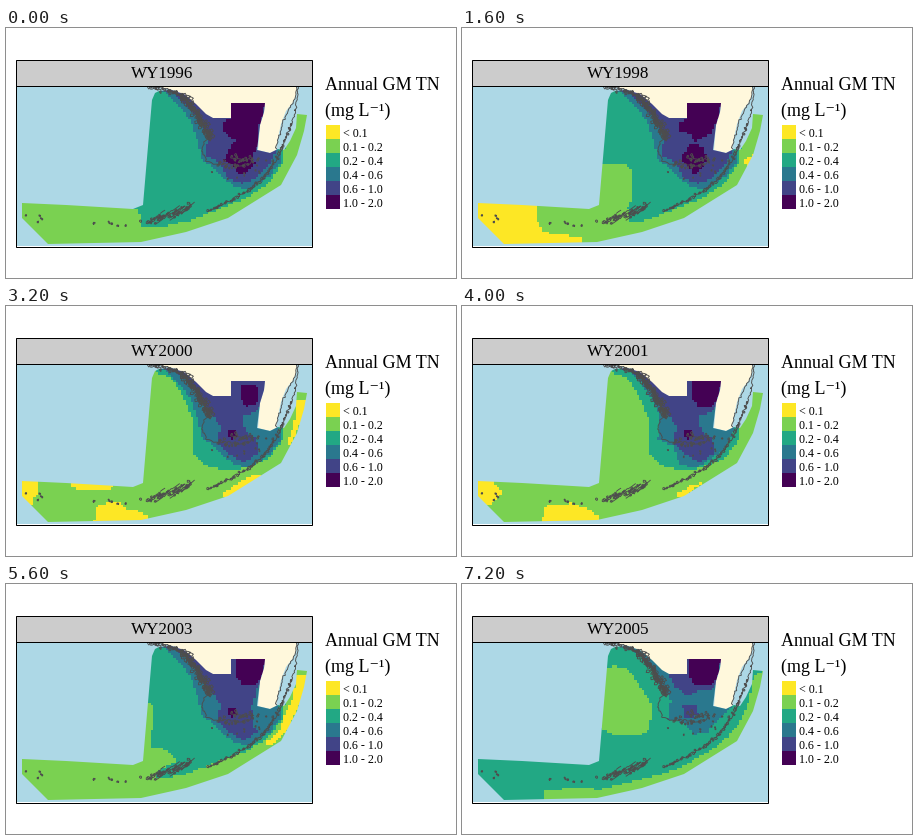
Animation of 450x250 px, one loop 8 s. Source, as a matplotlib script:

```python
import numpy as np
import matplotlib.pyplot as plt
from matplotlib.animation import FuncAnimation
from matplotlib.collections import LineCollection
from matplotlib.colors import ListedColormap
from matplotlib.patches import Polygon, Rectangle
from matplotlib.path import Path

W, H, DPI = 450, 250, 100
PX = 72 / DPI
CELL = 2.5
COLORS = ["#FDE725", "#7AD151", "#22A884", "#2A788E", "#414487", "#440154"]
LABELS = ["< 0.1", "0.1 - 0.2", "0.2 - 0.4", "0.4 - 0.6", "0.6 - 1.0", "1.0 - 2.0"]
SERIF = ["Liberation Serif", "DejaVu Serif"]
COAST = "#4D4D4D"
rng = np.random.default_rng(12)

AREA = [(16, 175), (60, 177), (127, 181), (137, 177), (141, 130), (146, 72),
        (149, 65), (153, 63), (165, 62), (178, 66), (190, 76), (200, 86),
        (207, 90), (225, 90), (225, 75), (259, 75), (258, 84), (254, 97),
        (251, 122), (264, 125), (272, 121), (278, 122), (284, 113),
        (290, 100), (291, 86), (301, 87), (298, 103), (291, 127), (275, 157),
        (222, 190), (180, 204), (135, 214), (42, 216), (16, 190)]
LAND = [(144, 57), (291, 57), (290, 67), (287, 74), (280, 83), (275, 96),
        (272, 110), (270, 122), (264, 125), (252, 122), (254, 97), (258, 84),
        (259, 75), (225, 75), (225, 90), (207, 90), (200, 87), (190, 79),
        (184, 71), (176, 68), (171, 63), (158, 60)]

# Concentration zones; the coastal ones close over the mainland
NORTH = [(285, 57), (145, 57)]
SHELF = NORTH + [(135, 120), (127, 180), (133, 183), (136, 199), (155, 200),
                 (185, 193), (205, 185), (240, 171), (262, 157), (277, 135),
                 (279, 119)]
BLUE_WIDE = NORTH + [(163, 68), (178, 84), (187, 97), (192, 115), (196, 132),
                     (208, 141), (217, 151), (230, 160), (245, 162),
                     (258, 152), (266, 147), (275, 134), (273, 121)]
INDIGO_WIDE = NORTH + [(168, 66), (184, 82), (195, 95), (203, 110), (199, 127),
                       (215, 137), (222, 151), (236, 156), (250, 152),
                       (262, 140), (270, 125)]
BLUE_MID = NORTH + [(165, 62), (180, 79), (191, 96), (198, 112), (196, 134),
                    (212, 141), (218, 160), (236, 162), (253, 151),
                    (264, 143), (272, 124)]
TEAL_MID = NORTH + [(150, 67), (166, 73), (177, 91), (187, 113), (188, 150),
                    (198, 160), (225, 166), (245, 160), (263, 154),
                    (276, 135), (279, 119)]
INDIGO_MID = NORTH + [(178, 70), (192, 88), (202, 104), (215, 121), (212, 138),
                      (225, 150), (238, 157), (253, 148), (251, 135),
                      (239, 124), (237, 111), (251, 106)]
BLUE_SLIM = NORTH + [(176, 70), (190, 86), (200, 104), (209, 117), (206, 136),
                     (222, 139), (233, 151), (245, 150), (254, 138), (270, 124)]
INDIGO_NORTH = [(206, 88), (225, 74), (260, 74), (256, 98), (248, 108),
                (236, 108), (226, 113), (214, 104)]
INDIGO_SOUTH = [(221, 122), (234, 121), (237, 132), (222, 136)]
CORE = [(231, 74), (260, 74), (257, 91), (250, 102), (237, 102), (231, 93)]
DOT = [(222, 126), (230, 124), (232, 132), (224, 134)]
WEST_END = [(14, 174), (76, 174), (76, 195), (81, 205), (100, 207),
            (120, 211), (120, 218), (14, 218)]
REEF_EAST = [(291, 94), (303, 94), (297, 112), (284, 142), (283, 134), (288, 120)]

years = {}


def add_year(year, base, *zones):
    """Rasterise the zones in order, later ones on top."""
    xs = np.arange(10, 305, CELL) + CELL / 2
    ys = np.arange(57, 218, CELL) + CELL / 2
    gx, gy = np.meshgrid(xs, ys)
    points = np.column_stack([gx.ravel(), gy.ravel()])
    grid = np.full(gx.size, base)
    for level, shape in zones:
        grid[Path(shape).contains_points(points)] = level
    years[year] = grid.reshape(gx.shape)


add_year(1996, 1, (2, SHELF), (3, BLUE_WIDE), (4, INDIGO_WIDE),
         (5, [(225, 74), (260, 74), (257, 86), (253, 98), (251, 122), (246, 127),
              (250, 137), (240, 146), (232, 147), (228, 139), (218, 134),
              (222, 124), (229, 113), (217, 104), (216, 96), (225, 90)]))
add_year(1997, 1, (2, SHELF[:3] + [(139, 178), (143, 193), (160, 195)] + SHELF[7:]),
         (3, BLUE_WIDE), (4, INDIGO_WIDE),
         (5, [(225, 74), (260, 74), (256, 92), (251, 108), (238, 112),
              (218, 104), (225, 90)]),
         (5, [(228, 118), (242, 120), (246, 131), (238, 144), (230, 142), (219, 132)]))
add_year(1998, 1,
         (2, NORTH + [(138, 136), (163, 136), (169, 143), (170, 172), (166, 180),
                      (168, 195), (185, 193), (205, 185), (240, 171),
                      (262, 157), (277, 135), (279, 119)]),
         (3, BLUE_WIDE), (4, INDIGO_WIDE), (0, WEST_END),
         (0, [(283, 132), (293, 127), (288, 139), (283, 138)]),
         (5, [(226, 74), (260, 74), (256, 92), (250, 106), (240, 110),
              (233, 116), (230, 107), (217, 104), (217, 97), (226, 90)]),
         (5, [(229, 116), (242, 120), (245, 131), (240, 142), (232, 147),
              (226, 138), (218, 132)]))
add_year(1999, 1, (2, TEAL_MID), (3, BLUE_WIDE), (4, INDIGO_MID),
         (0, WEST_END[:3] + [(90, 199), (112, 202), (132, 209), (132, 218), (14, 218)]),
         (0, REEF_EAST), (5, CORE), (5, DOT))
add_year(2000, 1, (2, TEAL_MID), (3, BLUE_WIDE), (4, INDIGO_MID),
         (0, [(14, 174), (33, 174), (33, 189), (27, 193), (26, 201), (14, 201)]),
         (0, [(65, 175), (108, 178), (108, 183), (78, 185), (65, 182)]),
         (0, [(92, 199), (115, 197), (118, 203), (128, 204), (143, 211),
              (141, 218), (88, 218)]),
         (0, [(215, 190), (232, 178), (245, 171), (256, 168), (250, 178), (222, 193)]),
         (0, REEF_EAST),
         (5, [(236, 80), (250, 79), (254, 90), (250, 99), (240, 101), (234, 92)]),
         (5, DOT))
add_year(2001, 1, (2, TEAL_MID), (3, BLUE_MID), (4, INDIGO_MID),
         (0, [(14, 174), (30, 174), (40, 187), (27, 200), (14, 201)]),
         (0, [(84, 201), (110, 198), (128, 204), (138, 212), (136, 218), (80, 218)]),
         (0, [(214, 189), (230, 180), (240, 178), (220, 194)]),
         (5, CORE), (5, DOT))
add_year(2002, 1,
         (2, NORTH + [(150, 66), (167, 75), (180, 86), (188, 99), (194, 112),
                      (196, 137), (213, 148), (215, 163), (232, 166),
                      (242, 156), (262, 150), (276, 134), (278, 119)]),
         (2, [(288, 84), (297, 84), (294, 91), (288, 91)]),
         (3, BLUE_SLIM), (4, INDIGO_NORTH), (4, INDIGO_SOUTH), (5, CORE),
         (0, [(14, 174), (32, 174), (32, 187), (14, 190)]),
         (0, [(50, 174), (102, 176), (101, 193), (115, 195), (119, 202),
              (130, 205), (140, 212), (138, 218), (80, 218), (85, 209),
              (79, 196), (66, 187), (50, 186)]),
         (0, [(212, 186), (224, 180), (232, 182), (220, 194), (212, 193)]))
add_year(2003, 1,
         (2, NORTH + [(144, 80), (142, 117), (147, 123), (147, 140), (144, 163),
                      (162, 167), (171, 178), (150, 189), (150, 195),
                      (178, 192), (205, 181), (240, 168), (262, 155),
                      (277, 135), (279, 119)]),
         (3, BLUE_WIDE), (4, INDIGO_MID[:-4] + [(248, 143), (246, 124), (251, 106)]),
         (0, [(291, 93), (303, 93), (295, 118), (283, 145), (266, 163),
              (259, 160), (273, 148), (280, 130), (287, 115)]),
         (5, CORE), (5, DOT))
add_year(2004, 2, (3, BLUE_MID), (4, INDIGO_NORTH),
         (4, [(219, 122), (234, 124), (251, 139), (249, 147), (238, 156),
              (228, 150), (226, 138), (219, 133)]),
         (5, [(236, 74), (260, 74), (255, 88), (250, 100), (243, 101), (237, 91)]))
add_year(2005, 2,
         (1, [(138, 87), (152, 83), (164, 84), (172, 93), (184, 112), (190, 121),
              (188, 146), (180, 151), (150, 151), (137, 144)]),
         (1, [(82, 208), (107, 205), (140, 206), (180, 196), (213, 187),
              (248, 168), (266, 154), (278, 139), (285, 124), (289, 108),
              (292, 92), (304, 86), (304, 135), (240, 200), (135, 218), (84, 218)]),
         (3, BLUE_SLIM), (4, INDIGO_NORTH), (4, INDIGO_SOUTH),
         (5, [(228, 74), (260, 74), (257, 90), (250, 103), (232, 102), (227, 90)]))


def along(path, count):
    """Evenly spaced points on a polyline."""
    p = np.array(path, float)
    dist = np.r_[0, np.cumsum(np.hypot(*np.diff(p, axis=0).T))]
    at = np.linspace(0, dist[-1], count)
    return np.column_stack([np.interp(at, dist, p[:, k]) for k in (0, 1)])


def shore(path, count, jitter):
    return [along(path, count) + rng.normal(0, jitter, (count, 2))]


def islets(path, count, spread, size):
    """Small irregular closed outlines scattered around a path."""
    rings = []
    for centre in along(path, count) + rng.normal(0, spread, (count, 2)):
        turn = np.linspace(0, 2 * np.pi, 6)[:, None]
        radius = size * rng.uniform(0.4, 1.2, (6, 1))
        ring = centre + radius * np.hstack([np.cos(turn), np.sin(turn)])
        ring[-1] = ring[0]
        rings.append(ring)
    return rings


def slivers(path, count, spread):
    """Short slanted strokes around a path."""
    strokes = []
    for x, y in along(path, count) + rng.normal(0, spread, (count, 2)):
        d = rng.uniform(1.5, 4)
        strokes.append([(x - d, y + d * 0.7), (x, y + rng.normal(0, 0.8)),
                        (x + d, y - d * 0.7)])
    return strokes


GULF = [(144, 58), (156, 61), (168, 64), (178, 69), (186, 79), (193, 89),
        (199, 101), (204, 110)]
CAPE = [(204, 108), (198, 115), (196, 123), (200, 132), (210, 137), (220, 136),
        (232, 138), (243, 136), (247, 131), (238, 132), (225, 130)]
KEYS = [(202, 183), (213, 178), (226, 172), (241, 163), (254, 153), (264, 142),
        (271, 130), (276, 119)]
BARRIER = [(276, 119), (281, 107), (286, 95), (289, 82), (292, 70), (291, 58)]
BAYSIDE = [(291, 59), (289, 70), (283, 81), (277, 94), (273, 108), (270, 122)]

coast = (
    shore(GULF, 70, 1.1) + shore(GULF[2:], 60, 1.7)
    + islets(GULF[:4], 22, 1.2, 1.5) + islets(GULF[3:], 75, 2.3, 2.1)
    + shore(CAPE, 60, 0.6) + islets(CAPE[4:], 28, 1.8, 1.3)
    + islets([(216, 142), (238, 147), (258, 136)], 14, 4, 0.9)
    + shore(KEYS, 50, 0.8) + islets(KEYS, 38, 0.8, 1.3)
    + shore(BARRIER, 36, 0.6) + islets(BARRIER[:3], 10, 0.8, 1.2)
    + shore(BAYSIDE, 36, 0.6)
    + slivers([(184, 178), (174, 183), (163, 187), (152, 191)], 34, 2.1)
    + islets([(184, 178), (165, 187), (137, 196)], 36, 2.2, 1.4)
)
for spot in [(20, 188), (32, 194), (35, 188), (36, 191), (88, 195), (103, 194),
             (106, 196), (111, 198), (120, 197)]:
    coast += islets([spot, spot], 2, 0.5, 0.9)

fig = plt.figure(figsize=(W / DPI, H / DPI), dpi=DPI, facecolor="white")
ax = fig.add_axes([0, 0, 1, 1])
ax.axis("off")


def box(x, y, w, h, **style):
    ax.add_patch(Rectangle((x, y), w, h, **style))


def label(x, y, text, size, **style):
    return ax.text(x, y, text, fontsize=size * PX, family=SERIF, color="black", **style)


box(9.5, 57, 296, 161, fc="#ADD8E6", ec="none")
raster = ax.imshow(years[1996], cmap=ListedColormap(COLORS), vmin=-0.5, vmax=5.5,
                   interpolation="nearest", aspect="auto", zorder=2,
                   extent=(10, 10 + years[1996].shape[1] * CELL,
                           57 + years[1996].shape[0] * CELL, 57))
ax.set(xlim=(0, W), ylim=(H, 0))
raster.set_clip_path(Polygon(AREA, transform=ax.transData))
ax.add_patch(Polygon(LAND, fc="#FFF8DC", ec="none", zorder=1.5))
lines = LineCollection(coast, colors=COAST, linewidths=0.9 * PX, zorder=3)
ax.add_collection(lines)
lines.set_clip_path(Rectangle((10, 57), 295, 161, transform=ax.transData))

box(9.5, 31.5, 296, 26, fc="#CCCCCC", ec="black", lw=PX, zorder=4)
box(9.5, 57.5, 296, 161, fc="none", ec="black", lw=PX, zorder=4)
title = label(156.5, 50, "WY1996", 17, ha="center", va="baseline", zorder=5)

label(319, 62, "Annual GM TN", 18, va="baseline")
label(319, 88, "(mg L⁻¹)", 18, va="baseline")
for i, (color, text) in enumerate(zip(COLORS, LABELS)):
    box(320, 97 + 14 * i, 14, 14, fc=color, ec="none")
    label(337, 109 + 14 * i, text, 12, va="baseline")


def draw(i):
    year = 1996 + i
    raster.set_data(years[year])
    title.set_text(f"WY{year}")
    return raster, title


anim = FuncAnimation(fig, draw, frames=10, interval=800, repeat=True, repeat_delay=0)
plt.show()
```
